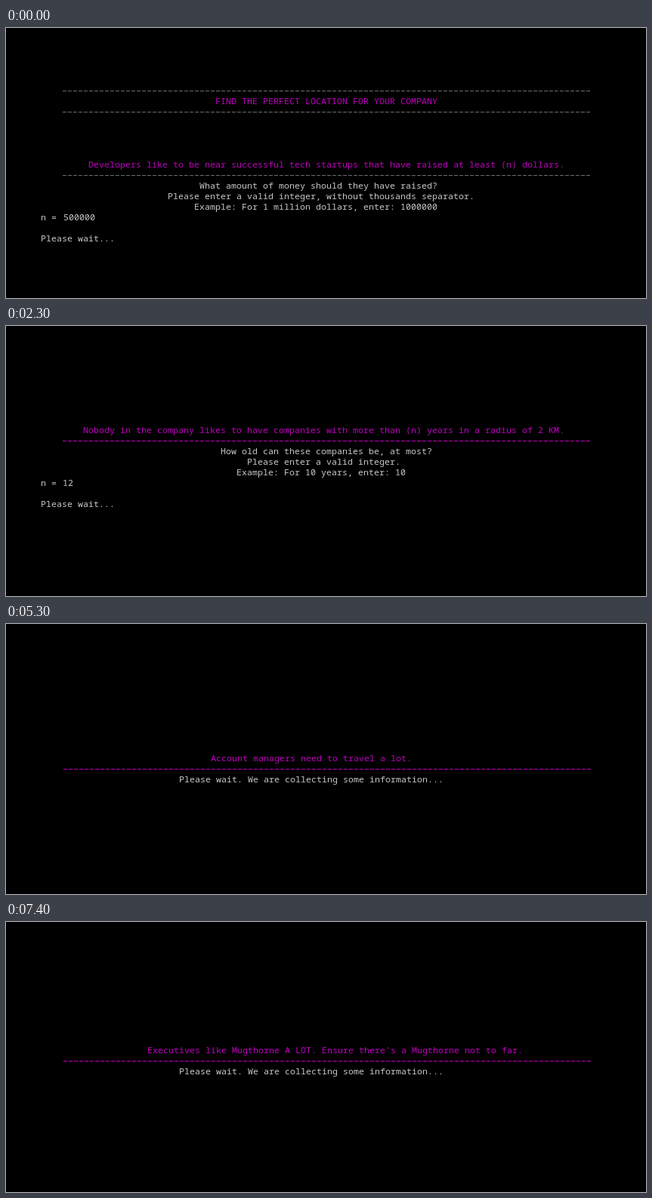
An HTML page with a canvas for the animation above (8 s loop, 847 by 358 pixels).

```html
<!DOCTYPE html>
<html lang="en">
<head>
<meta charset="utf-8">
<title>Terminal prompts</title>
<style>
html, body { margin: 0; width: 100%; height: 100%; overflow: hidden; background: #000; }
canvas { display: block; width: 847px; height: 358px; }
</style>
</head>
<body>
<canvas id="stage" width="847" height="358"></canvas>
<script>
const ctx = document.getElementById("stage").getContext("2d");
const CELL = 7, ROW = 14, LOOP = 8000;
const MAGENTA = "#c000c0", GRAY = "#c8c8c8", DIM = "#6c6c6c";
const MARGIN = 46;

// Every character sits on the terminal's fixed cell grid.
function write(text, x, baseline, color = GRAY) {
  ctx.fillStyle = color;
  [...text].forEach((char, i) => ctx.fillText(char, x + i * CELL, baseline));
}

function rule(x, baseline, color = MAGENTA) {
  ctx.fillStyle = color;
  for (let i = 0; i < 100; i++) ctx.fillRect(x + i * CELL + 1, baseline - 4, 5, 1);
}

function answer(value, x, baseline) {
  write("n =", MARGIN, baseline);
  write(value, x, baseline);
  write("Please wait...", MARGIN, baseline + 2 * ROW);
}

function collecting(title, x, baseline) {
  write(title, x, baseline, MAGENTA);
  rule(75, baseline + ROW);
  write("Please wait. We are collecting some information...", 229, baseline + 2 * ROW);
}

function fundingScreen() {
  rule(74, 87, DIM);
  write("FIND THE PERFECT LOCATION FOR YOUR COMPANY", 277, 101, MAGENTA);
  rule(74, 115, DIM);
  write("Developers like to be near successful tech startups that have raised at least (n) dollars.", 109, 185, MAGENTA);
  rule(74, 199, DIM);
  write("What amount of money should they have raised?", 256, 213);
  write("Please enter a valid integer, without thousands separator.", 214, 227);
  write("Example: For 1 million dollars, enter: 1000000", 249, 241);
  answer("500000", 76, 255);
}

function ageScreen() {
  write("Nobody in the company likes to have companies with more than (n) years in a radius of 2 KM.", 102, 142, MAGENTA);
  rule(74, 156);
  write("How old can these companies be, at most?", 284, 170);
  write("Please enter a valid integer.", 319, 184);
  write("Example: For 10 years, enter: 10", 305, 198);
  answer("12", 75, 212);
}

const scenes = [
  { until: 500, draw: fundingScreen },
  { until: 3500, draw: ageScreen },
  { until: 6500, draw: () => collecting("Account managers need to travel a lot.", 271, 182) },
  { until: LOOP, draw: () => collecting("Executives like Mugthorne A LOT. Ensure there's a Mugthorne not to far.", 187, 174) }
];

const start = performance.now();

function frame(now) {
  const time = Math.max(0, now - start) % LOOP;
  ctx.fillStyle = "#000";
  ctx.fillRect(0, 0, 847, 358);
  ctx.font = "11.667px 'Noto Sans Mono', 'DejaVu Sans Mono', monospace";
  scenes.find(scene => time < scene.until).draw();
  requestAnimationFrame(frame);
}
frame(start);
</script>
</body>
</html>
```
